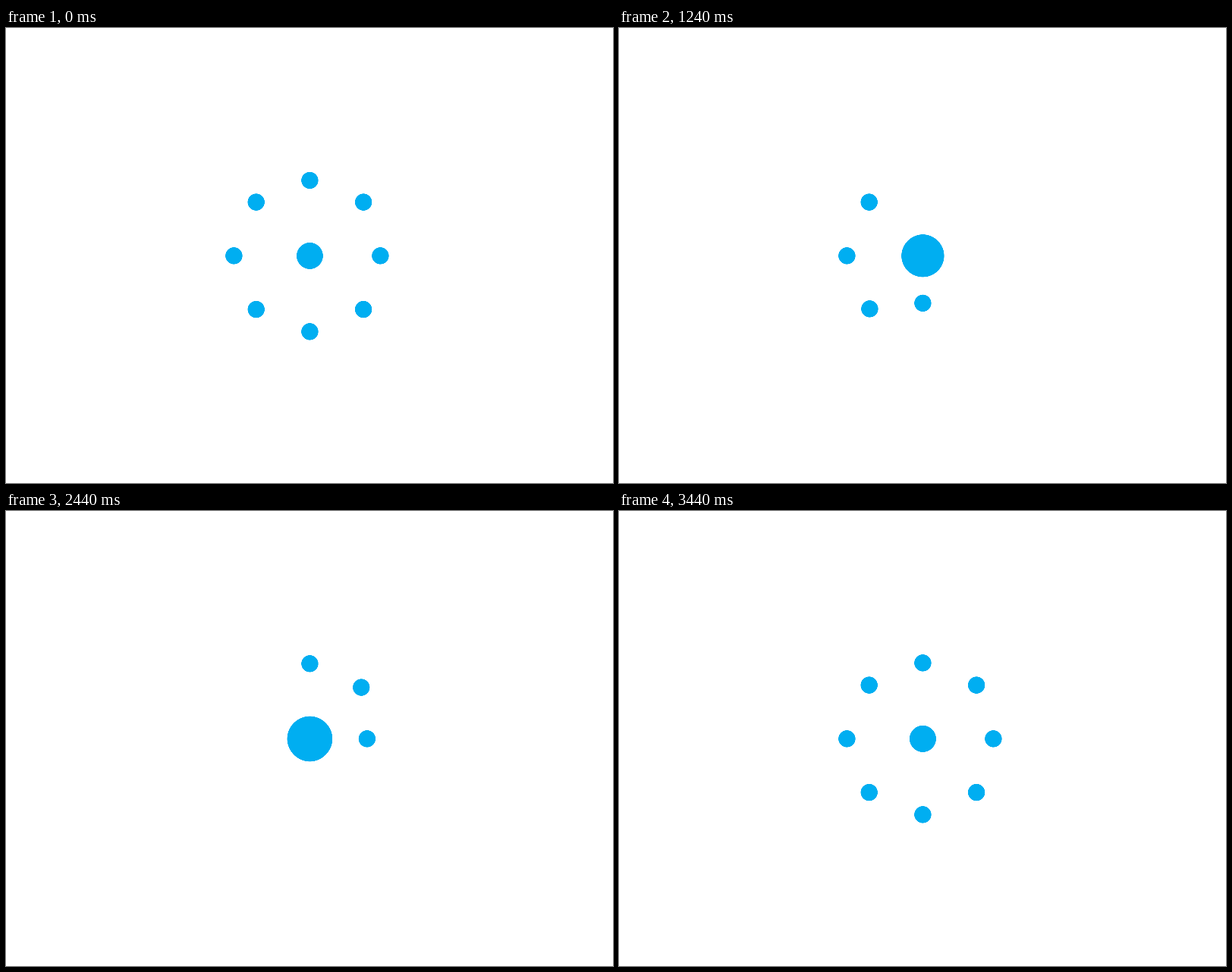
Animation, 800 px wide and 600 px high, one loop 3.48 s. Source, as an HTML page:

```html
<!DOCTYPE html>
<html lang="en">
<head>
<meta charset="utf-8">
<title>Gooey dots</title>
<style>
  html, body { margin: 0; width: 100%; height: 100%; overflow: hidden; background: #fff; }
  svg { display: block; width: 800px; height: 600px; }
</style>
</head>
<body>
<svg viewBox="0 0 800 600">
  <filter id="goo" filterUnits="userSpaceOnUse" x="200" y="100" width="400" height="400"
          color-interpolation-filters="sRGB">
    <feGaussianBlur stdDeviation="7"/>
    <feColorMatrix values="0 0 0 0 0  0 0 0 0 .682  0 0 0 0 .945  0 0 0 40 -16.2"/>
  </filter>
  <g id="blobs" fill="#00aef1" filter="url(#goo)"></g>
</svg>
<script>
  const LOOP = 3480, STEP = 40, COUNT = 8;
  const CX = 400.4, CY = 300.4;
  const IN = { start: -115, gap: 240, length: 460 };
  const OUT = { start: 2181, gap: 84, length: 378 };
  const SHRINK = { start: 2354, length: 1450 };
  const REST = 17.3, GROWTH = 2.7;

  const clamp = x => Math.min(1, Math.max(0, x));
  const expoIn = x => x <= 0 ? 0 : 2 ** (10 * (clamp(x) - 1));
  const expoOut = x => x >= 1 ? 1 : 1 - 2 ** (-10 * clamp(x));

  // Drawn radius that gives the wanted radius after blur and threshold
  const drawn = r => r - 1.4 + 24.5 / r;

  const group = document.getElementById('blobs');
  function circle(r) {
    const el = document.createElementNS('http://www.w3.org/2000/svg', 'circle');
    el.setAttribute('cx', CX);
    el.setAttribute('cy', CY);
    el.setAttribute('r', drawn(r));
    return group.appendChild(el);
  }

  const core = circle(REST);
  const dots = Array.from({ length: COUNT }, (_, i) => ({
    el: circle(11),
    angle: (i - 2) * Math.PI / 4,
    reach: i === 2 ? 93 : 100
  }));

  function distance(i, t) {
    const out = t - OUT.start - i * OUT.gap;
    if (out >= 0) return expoOut(out / OUT.length);
    return 1 - expoIn((t - IN.start - i * IN.gap) / IN.length);
  }

  // The core swells as each of the first seven dots arrives
  function coreRadius(t) {
    let size = 0;
    for (let i = 0; i < COUNT - 1; i++) {
      const arrival = IN.start + IN.length + i * IN.gap;
      size += clamp((t - arrival + 15) / 30);
    }
    return REST + GROWTH * size * (1 - expoOut((t - SHRINK.start) / SHRINK.length));
  }

  function draw(t) {
    core.setAttribute('r', drawn(coreRadius(t)));
    dots.forEach(({ el, angle, reach }, i) => {
      const d = reach * distance(i, t);
      el.setAttribute('cx', CX + d * Math.cos(angle));
      el.setAttribute('cy', CY + d * Math.sin(angle));
    });
  }

  const begin = performance.now();
  function tick() {
    const t = (performance.now() - begin) % LOOP;
    draw(Math.floor(t / STEP) * STEP);
    requestAnimationFrame(tick);
  }
  tick();
</script>
</body>
</html>
```
